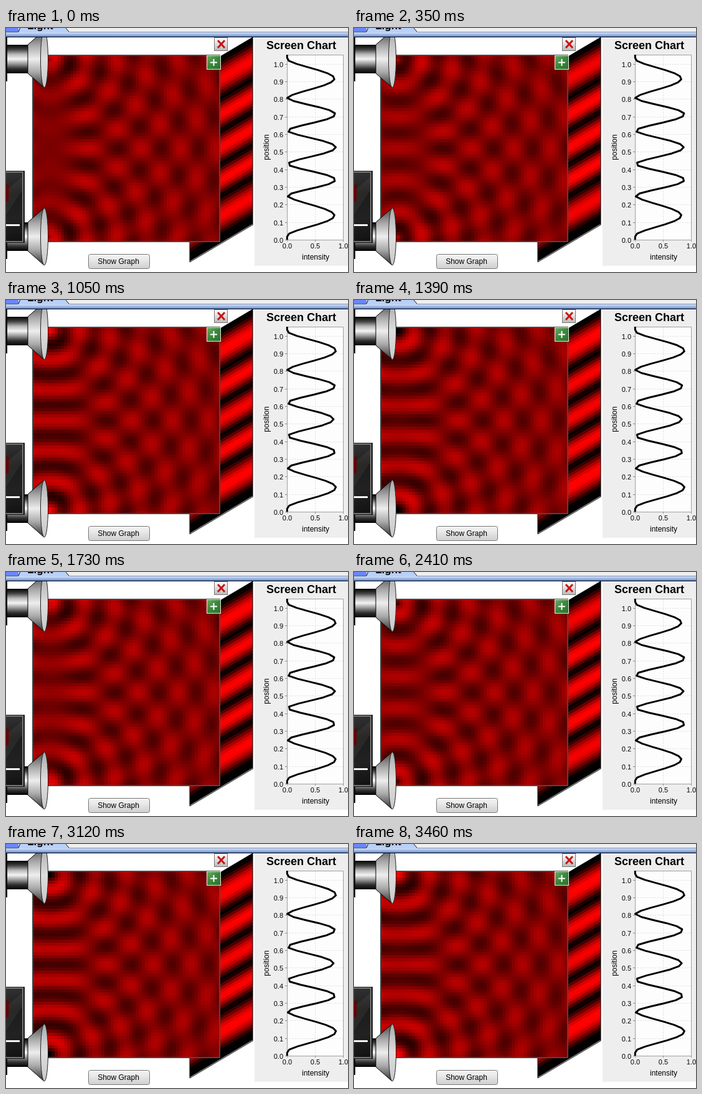
These frames come from a looping animation (549 px wide and 393 px high, 3690 ms). An HTML page with a canvas:

```html
<!DOCTYPE html>
<html lang="en">
<head>
<meta charset="utf-8">
<title>Wave interference</title>
<style>
html, body { margin: 0; width: 100%; height: 100%; overflow: hidden; background: #fff; }
canvas { display: block; }
</style>
</head>
<body>
<canvas id="stage" width="549" height="393"></canvas>
<script>
const ctx = document.getElementById('stage').getContext('2d');
const SANS = '"Liberation Sans", Arial, sans-serif';
const RAD = Math.PI / 180;

const LOOP = 3690;
const STARTS = [0, 350, 710, 1050, 1390, 1730, 2070, 2410, 2760, 3120, 3460];
// Phase in degrees at the midpoint between the two sources.
const PHASES = [108, 326, 200, 30, 235, 85, 298, 152, 350, 212, 50];

const CELL = 5, CELLS = 60;
const FIELD = { x: 43, y: 44 };
const SOURCE = { x: 70, top: 50, bottom: 338 };
const WAVELENGTH = 49;
const NODES = [0.025, 0.25, 0.43, 0.62, 0.805, 1.025];
const PLOT = { x: 451, y: 43, w: 90, h: 298, unit: 283.5 };

function rect(x, y, w, h, fill) {
  ctx.fillStyle = fill;
  ctx.fillRect(x, y, w, h);
}

function line(x1, y1, x2, y2, color, width = 1) {
  ctx.strokeStyle = color;
  ctx.lineWidth = width;
  ctx.beginPath();
  ctx.moveTo(x1, y1);
  ctx.lineTo(x2, y2);
  ctx.stroke();
}

function poly(points, fill, stroke) {
  ctx.beginPath();
  points.forEach(([x, y]) => ctx.lineTo(x, y));
  ctx.closePath();
  if (fill) { ctx.fillStyle = fill; ctx.fill(); }
  if (stroke) { ctx.strokeStyle = stroke; ctx.lineWidth = 1; ctx.stroke(); }
}

function gradient(x1, y1, x2, y2, colors) {
  const g = ctx.createLinearGradient(x1, y1, x2, y2);
  colors.forEach((c, i) => g.addColorStop(i / (colors.length - 1), c));
  return g;
}

function text(str, x, y, size, align = 'center', weight = '') {
  ctx.font = `${weight} ${size}px ${SANS}`;
  ctx.textAlign = align;
  ctx.fillStyle = '#000';
  ctx.fillText(str, x, y);
}

function red(v) {
  return `rgb(${Math.round(255 * Math.max(0, Math.min(1, v)))},0,0)`;
}

function ripple(dx, dy, theta) {
  const r = Math.hypot(dx, dy);
  return Math.cos(theta - 2 * Math.PI * r / WAVELENGTH) / Math.sqrt(1 + r / 9);
}

function drawField(phase) {
  const theta = (phase - 35) * RAD;
  for (let row = 0; row < CELLS; row++) {
    const y = FIELD.y + (row + 0.5) * CELL;
    for (let col = 0; col < CELLS; col++) {
      const dx = FIELD.x + (col + 0.5) * CELL - SOURCE.x;
      const v = ripple(dx, y - SOURCE.top, theta) + ripple(dx, y - SOURCE.bottom, theta);
      rect(FIELD.x + col * CELL, FIELD.y + row * CELL, CELL, CELL, red((v + 1) / 2));
    }
  }
  ctx.strokeStyle = '#484848';
  ctx.lineWidth = 2;
  ctx.strokeRect(43, 44, 300, 300);
}

// Position along the fringes: which lobe, and how far through it (0..1).
function lobeAt(pos) {
  let i = 0;
  while (i < 4 && pos > NODES[i + 1]) i++;
  let u = (pos - NODES[i]) / (NODES[i + 1] - NODES[i]);
  if (u < 0 || u > 1) u *= 0;
  return { i, u };
}

function peak(i, phase) {
  const wobble = (mid, amp, lag) => (mid + amp * Math.cos((2 * phase - lag) * RAD)) / 90;
  if (i === 2) return wobble(76.5, 2, 250);
  return i % 2 ? wobble(77.5, 1.7, 310) : wobble(76.7, 2.5, 110);
}

function intensity(pos, phase, power) {
  const { i, u } = lobeAt(pos);
  return peak(i, phase) * Math.pow(Math.abs(Math.sin(Math.PI * u)), power);
}

function drawScreen(phase) {
  const left = 295, right = 396;
  const slant = (x, y) => [x, y - (x - 345.5) * 0.594];
  for (let row = 0; row < CELLS; row++) {
    const y = 45 + row * CELL;
    const pos = (341 - y - CELL / 2) / PLOT.unit;
    const fill = red(intensity(pos, phase, 1.4) * 1.17);
    const low = Math.min(y + CELL + 0.7, 347);
    poly([slant(left, y), slant(right, y), slant(right, low), slant(left, low)], fill);
  }
  poly([slant(left, 45), slant(right, 45), slant(right, 347), slant(left, 347)], null, '#000');
}

function drawLamp(cy) {
  const metal = ['#000', '#444', '#b8b8b8', '#f4f4f4', '#999', '#333', '#000'];
  rect(0, cy - 23, 37, 46, gradient(0, cy - 23, 0, cy + 23, metal));
  line(1, cy - 36, 1, cy + 36, '#000', 2);
  poly([[35, cy - 23], [61, cy - 46], [61, cy + 46], [35, cy + 23]],
    gradient(0, cy - 42, 0, cy + 42, ['#555', '#aaa', '#eee', '#aaa', '#444']), '#000');
  ctx.beginPath();
  ctx.ellipse(61.5, cy, 6, 46, 0, 0, 2 * Math.PI);
  ctx.fillStyle = gradient(0, cy - 46, 0, cy + 46, ['#aaa', '#dedede', '#c8c8c8']);
  ctx.fill();
  ctx.strokeStyle = '#222';
  ctx.lineWidth = 1;
  ctx.stroke();
}

function drawBox() {
  rect(0, 230, 30, 116, '#111');
  rect(0, 231, 28, 114, '#777');
  rect(0, 233, 26, 110, gradient(0, 233, 26, 343, ['#333', '#1c1c1c', '#222', '#111']));
  poly([[0, 262], [26, 240], [26, 262], [0, 300]], 'rgba(255,255,255,.05)');
  rect(0, 252, 4, 27, '#650000');
  rect(0, 316, 22, 3, '#f4f4f4');
}

function drawHeader() {
  rect(0, 0, 549, 7, '#eeeeee');
  rect(0, 0, 20, 6, '#6b86ff');
  rect(0, 6, 549, 8, gradient(0, 6, 0, 14, ['#dbe7fb', '#a9c1ea', '#6386c4']));
  poly([[20, 7], [23, -2], [93, -2], [101, 7]], '#b9d0fa');
  line(20, 6, 23, -1, '#000');
  line(95, -1, 101, 6, '#000');
  line(0, 6.5, 20, 6.5, '#44578e');
  line(101, 6.5, 549, 6.5, '#8896b5');
  rect(0, 14, 549, 1, '#000');
  text('Light', 55, 2, 17, 'center', 'bold');
}

function drawButtons() {
  rect(334, 15, 22, 22, '#777');
  rect(335, 16, 20, 20, gradient(0, 16, 0, 36, ['#fff', '#ddd', '#bbb']));
  line(340, 20, 351, 32, '#c81414', 3);
  line(351, 20, 340, 32, '#c81414', 3);

  rect(322, 44, 23, 23, '#e4efe4');
  rect(323, 45, 21, 21, gradient(323, 45, 344, 66, ['#68ad68', '#3b873b', '#2d722d']));
  line(333.5, 50, 333.5, 61, '#fff', 2);
  line(328, 55.5, 339, 55.5, '#fff', 2);

  ctx.beginPath();
  ctx.roundRect(132.5, 364.5, 98, 23, 3);
  ctx.fillStyle = gradient(0, 364, 0, 388, ['#f4f4f4', '#ebebeb', '#dcdcdc', '#cfcfcf']);
  ctx.fill();
  ctx.strokeStyle = '#777';
  ctx.lineWidth = 1;
  ctx.stroke();
  text('Show Graph', 180.5, 380, 12);
}

function drawChart(phase) {
  const { x, y, w, h, unit } = PLOT, base = y + h;
  rect(397, 15, 152, 368, '#eeeeee');
  rect(397, 15, 2, 368, '#fff');
  text('Screen Chart', 474, 34, 18, 'center', 'bold');
  rect(x, y, w, h, '#fdfdfd');

  for (let i = 0; i <= 10; i++) {
    const ty = Math.round(base - i / 10 * unit) + 0.5;
    ctx.setLineDash([2, 2]);
    line(x, ty, x + w, ty, '#dedede');
    ctx.setLineDash([]);
    line(x - 3, ty, x, ty, '#888');
    text((i / 10).toFixed(1), 445, ty + 4, 11, 'right');
  }
  for (let i = 0; i <= 2; i++) {
    const tx = x + i * 45 + 0.5;
    ctx.setLineDash([2, 2]);
    line(tx, y, tx, base, '#dedede');
    ctx.setLineDash([]);
    line(tx, base, tx, base + 3, '#888');
    text((i / 2).toFixed(1), tx, 355, 11);
  }
  ctx.strokeStyle = '#a0a0a0';
  ctx.lineWidth = 1;
  ctx.strokeRect(x + 0.5, y + 0.5, w, h);

  text('intensity', 497, 373, 12);
  ctx.save();
  ctx.translate(422, 192);
  ctx.rotate(-Math.PI / 2);
  text('position', 0, 0, 12);
  ctx.restore();

  ctx.beginPath();
  for (let i = 0; i <= CELLS; i++) {
    const py = base - h * i / CELLS;
    ctx.lineTo(x + 0.3 + w * intensity((base - py) / unit, phase, 1.6), py);
  }
  ctx.strokeStyle = '#000';
  ctx.lineWidth = 3;
  ctx.lineJoin = 'round';
  ctx.stroke();
}

function draw(phase) {
  rect(0, 0, 549, 393, '#fff');
  drawScreen(phase);
  drawField(phase);
  drawLamp(50);
  drawLamp(336);
  drawBox();
  drawChart(phase);
  drawHeader();
  drawButtons();
}

let shown = -1;
const begin = performance.now();

function tick() {
  const t = (performance.now() - begin) % LOOP;
  const step = STARTS.findLastIndex(s => s <= t);
  if (step !== shown) {
    shown = step;
    draw(PHASES[step]);
  }
  requestAnimationFrame(tick);
}
tick();
</script>
</body>
</html>
```
